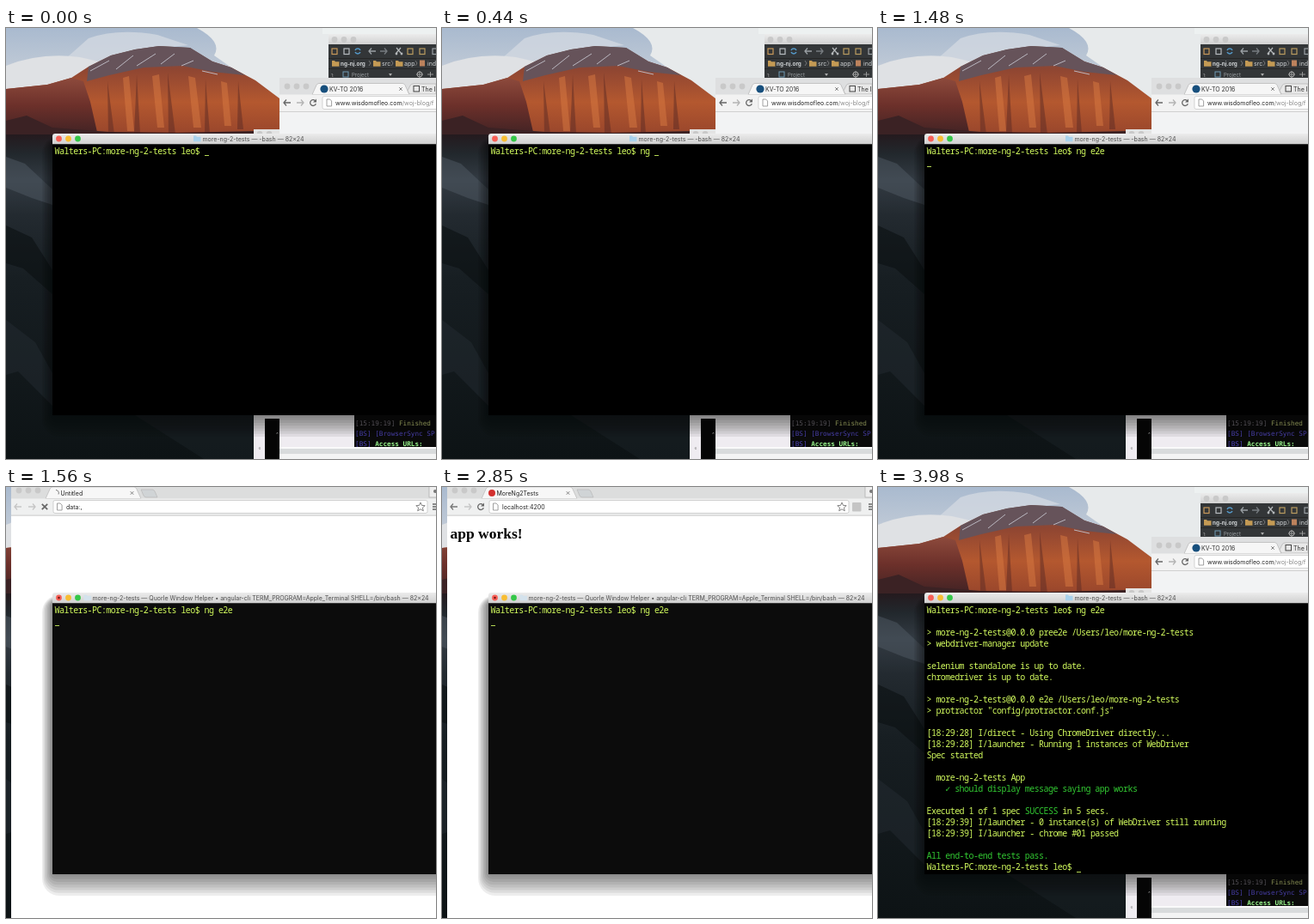
An HTML page for the animation above (8000 ms loop, 500 px wide and 502 px high).

```html
<!DOCTYPE html>
<html lang="en">
<head>
<meta charset="utf-8">
<title>End-to-end test run</title>
<style>
  html, body { margin: 0; width: 100%; height: 100%; overflow: hidden; background: #000; }
  svg { display: block; }
  text { font: 7px Inter, Roboto, sans-serif; white-space: pre; }
  .term text { font: 500 10px "Noto Sans Mono", "DejaVu Sans Mono", monospace; letter-spacing: -.56px; fill: #d2fb5e; }
  .term .ok { fill: #32c832; }
  .log text { font: 7.7px "DejaVu Sans Mono", monospace; }
  .serif { font-family: "Liberation Serif", serif; }
</style>
</head>
<body>
<svg id="stage" width="500" height="502" viewBox="0 0 500 502"></svg>
<script>
const LOOP = 8000, COL = 5.44, ROW = 13.04, LEFT = 56.5, BASE = 146.5;
const HOST = 'Walters-PC:more-ng-2-tests leo$ ';
const stage = document.getElementById('stage');

const rect = (x, y, w, h, fill, more = '') =>
  `<rect x="${x}" y="${y}" width="${w}" height="${h}" fill="${fill}" ${more}/>`;
const path = (d, fill, more = '') => `<path d="${d}" fill="${fill}" ${more}/>`;
const line = (d, color, w = 1) => path(d, 'none', `stroke="${color}" stroke-width="${w}"`);
const dot = (x, y, r, fill, more = '') => `<circle cx="${x}" cy="${y}" r="${r}" fill="${fill}" ${more}/>`;
const text = (x, y, s, fill = '#333', more = '') => `<text x="${x}" y="${y}" fill="${fill}" ${more}>${s}</text>`;
const lights = (x, y, fills) => fills.map((f, i) => dot(x + i * 11, y, 3.4, f)).join('');
const grey = Array(3).fill('#c9c9c9');
const folder = (x, y, fill) => path(`M${x} ${y}h3l1 1.3h4.5v5.5h-8.5z`, fill);
const arrow = (x, y, dir, color) =>
  line(`M${x - 4} ${y}h8M${x + dir} ${y - 3.5}l${dir * 3} 3.5l${-dir * 3} 3.5`, color, 1.3);
const reload = (x, y) =>
  line(`M${x + 2.5} ${y - 2.3}a3.4 3.4 0 1 0 .8 3.5`, '#666', 1.3) + path(`M${x + 4} ${y - 4.5}v4h-4z`, '#666');
const cross = (x, y, r, w, color = '#666') =>
  line(`M${x - r} ${y - r}l${2 * r} ${2 * r}m0 ${-2 * r}l${-2 * r} ${2 * r}`, color, w);
const sheet = (x, y) =>
  path(`M${x} ${y}h3.6l2 2v6h-5.6z`, '#fff', 'stroke="#888" stroke-width=".8"');
const star = x => path(`M${x} 18l1.5 3.4 3.7.3-2.8 2.4.9 3.7-3.3-2-3.3 2 .9-3.7-2.8-2.4 3.7-.3z`,
  'none', 'stroke="#777" stroke-width=".9"');
const gradient = (id, ...stops) => `<linearGradient id="${id}" x2="0" y2="1">${
  stops.map(([at, c]) => `<stop offset="${at}" stop-color="${c}"/>`).join('')}</linearGradient>`;

const defs = `<defs>${
  gradient('sky', [0, '#a9bacf'], [.3, '#bcc7d5'], [.6, '#dcdde2'])}${
  gradient('cliff', [0, '#6f5450'], [.25, '#8f4632'], [.6, '#b4582f'], [.9, '#9c482c'], [1, '#6a3026'])}${
  gradient('slope', [0, '#8d4a3c'], [.45, '#6c302a'], [1, '#3a2023'])}${
  gradient('rock', [0, '#241a1e'], [.06, '#22282d'], [.14, '#333b43'], [.25, '#232a30'], [.45, '#171e22'], [1, '#0d1315'])}${
  gradient('bar', [0, '#ececec'], [1, '#cfcfcf'])}</defs>`;

function photo() {
  return rect(0, 0, 500, 130, 'url(#sky)') +
    path('M96 12Q130 0 176 8L212 20 150 26 100 42 60 44z', '#d3d9e1', 'opacity=".8"') +
    path('M222 0H500V122H318L290 62 262 46 242 32Q252 16 222 0z', '#e7eaeb') +
    path('M0 44Q40 28 86 34L112 40 76 60 48 68 0 72z', '#dfe1e4') +
    path('M0 71L48 66 76 58 96 45 122 32 150 25 178 21 214 23 240 39 262 46 290 61 318 82V130H0z', 'url(#cliff)') +
    path('M0 71L48 66 76 58 90 62 98 86 108 130H0z', 'url(#slope)') +
    path('M96 45L122 32 150 25 178 21 214 23 240 39 262 46 278 55 240 51 205 44 160 46 120 55 94 62z', '#66535a') +
    line('M98 50l22-12m8 10l20-16m4 12l22-14m6 12l16-12m8 14l14-6m10 12l18 4', '#bab7c0') +
    path('M118 62l8 62h-7zM152 55l4 68h-7zM188 52l9 72h-8zM232 60l5 63h-6zM270 62l6 56h-7z', '#5c2a24', 'opacity=".5"') +
    path('M136 58l5 62h8l-6-64zM170 56l6 60h8l-6-62zM212 56l6 60h9l-7-58zM250 62l4 52h8l-5-50z', '#d97a42', 'opacity=".5"') +
    path('M0 108L24 102 54 116 120 121 200 122 290 120 318 122V140H0z', '#3b2224') +
    rect(0, 124, 500, 378, 'url(#rock)') +
    path('M0 150L22 158 54 188V206L30 198 0 186z', '#515b65', 'opacity=".5"') +
    path('M0 230L30 244 54 282V310L20 280 0 274z', '#0a0f11', 'opacity=".6"') +
    path('M0 340L34 366 54 402V440L14 400 0 404z', '#283137', 'opacity=".4"') +
    path('M150 451H287V502H230z', '#1b2327', 'opacity=".5"');
}

function editor() {
  const tools = ['#c9995a', '#b8bcc0', '#5599c8', '#9aa0a4', '#777c80', '#b4b8ba', '#b99c60', '#b99c60', '#9aa0a4'];
  const xs = [382, 396, 409, 426, 439, 457, 470, 484, 499];
  return rect(368, 0, 132, 7, '#edf1f1') +
    rect(375, 7, 125, 13, 'url(#bar)') + lights(382, 13.5, grey) +
    rect(375, 19, 125, 40, '#333638') + rect(375, 35, 125, .8, '#222') + rect(375, 47, 125, .8, '#222') +
    xs.map((x, i) => i === 2 ? line(`M${x - 3} 26a3.3 3.3 0 0 1 6 0m0 2a3.3 3.3 0 0 1-6 0`, tools[i], 1.5)
      : i === 3 || i === 4 ? arrow(x, 27, i === 3 ? -1 : 1, tools[i])
      : i === 5 ? line('M454 23l5 6m0-6l-5 6', tools[i], 1.2) + dot(454, 30, 1.4, tools[i]) + dot(460, 30, 1.4, tools[i])
      : rect(x - 3, 24, 6, 6.5, 'none', `stroke="${tools[i]}" stroke-width="1.2"`)).join('') +
    [[379, 'ng-nj.org'], [427, 'src'], [453, 'app']].map(([x, s], i) =>
      folder(x, 38, '#c49a54') + text(x + 10, 44, s, '#d0d3d5', i ? '' : 'style="font-size:6.3px;font-weight:700"')).join('') +
    line('M422 38l2 3-2 3M448 38l2 3-2 3M476 38l2 3-2 3', '#888', .8) +
    rect(481, 37.5, 6, 7, '#bd825c') + text(490, 44, 'ind', '#d0d3d5') +
    text(378, 57, '1:', '#aaa', 'style="font-size:5px"') + rect(392, 51, 6, 6, 'none', 'stroke="#719ab3"') +
    text(402, 56.5, 'Project', '#9ba0a3', 'style="font-size:6px"') + path('M445 53h4l-2 3z', '#aaa') +
    dot(481, 54, 3, 'none', 'stroke="#aaa"') + line('M481 50v8m-4-4h8M490 54h7m-3.5-3v6', '#aaa', .8);
}

function backBrowser() {
  return rect(288, 118, 33, 10, '#e4e4e4') + lights(295, 123.5, grey.slice(1)) +
    rect(318, 58, 182, 66, '#f2f3f4') + rect(318, 58, 182, 20, '#dedfe0') + lights(327, 68, grey) +
    path('M356 77.5l5-11q1-2 3-2h97q2 0 3 2l5 11z', '#f6f6f6', 'stroke="#b4b4b4" stroke-width=".7"') +
    path('M467 73l3-6q1-2 3-2h27v12h-31z', '#e8e8e8', 'stroke="#b4b4b4" stroke-width=".7"') +
    dot(370, 71, 4.6, '#174f7d') + text(376, 73.5, 'KV-TO 2016') + cross(459, 71, 1.8, .8) +
    rect(474, 67.5, 6.5, 6.5, 'none', 'stroke="#444"') + text(483, 73.5, 'The In') +
    rect(318, 77.5, 182, 19.5, '#f2f2f2') + rect(318, 97, 182, .7, '#c2c2c2') +
    arrow(327, 87, -1, '#666') + arrow(342, 87, 1, '#b4b4b4') + reload(357, 87) +
    rect(368, 79.5, 140, 15, '#fff', 'rx="2" stroke="#c4c4c4" stroke-width=".7"') + sheet(373, 83) +
    text(383, 89.5, 'www.wisdomofleo.com<tspan fill="#888">/woj-blog/f</tspan>', '#222');
}

function lowerWindows() {
  return rect(288, 445, 212, 57, '#efecf1') + rect(301, 455, 17, 47, '#050505') +
    rect(318, 488, 182, 2, '#fafafa') + rect(318, 490, 182, 6, '#d8dbdc') + rect(318, 496, 182, 6, '#f3f4f4') +
    text(293.5, 491, 'e', '#888', 'style="font-size:5px"') + text(314, 475, '^', '#aaa', 'style="font-size:6px"') +
    rect(405, 445, 95, 43, '#0a0a0a') +
    `<g class="log">${
      text(406, 463, '[15:19:19] <tspan fill="#c3cd78">Finished</tspan>', '#77737b')}${
      text(406, 475, '[BS] [BrowserSync SP', '#4d43b5')}${
      text(406, 487, '[BS] <tspan fill="#98f58c" font-weight="700">Access URLs:</tspan>', '#4d43b5')}</g>`;
}

function shadow() {
  let s = '';
  for (let i = 0; i < 8; i++)
    s += rect(42 + i * 1.5, 126 + i, 480, 350 - i * 4.2, '#000', `rx="${20 - i * 2}" opacity=".07"`);
  return s;
}

function browser({ tab, url, busy, app, body }) {
  const icon = app ? dot(58, 7, 4, '#d3302f')
    : busy ? line('M58 3.5a3.5 3.5 0 0 1 3 5', '#777', 1) : sheet(55, 3);
  return rect(6, 0, 494, 502, '#fff') + rect(6, 0, 494, 14, '#dcdddd') + lights(15, 4, grey) +
    path('M46 13.5l5-11q1-2.5 3-2.5h95q2 0 3 2.5l5 11z', '#f7f7f7', 'stroke="#b8b8b8" stroke-width=".7"') +
    path('M157 3h13q2 0 3 2l3 7h-13q-2 0-3-2z', '#d0d4d6', 'stroke="#b8b8b8" stroke-width=".7"') +
    icon + text(63.5, 9.5, tab, '#222') + cross(146.5, 7, 1.8, .8) +
    rect(492, -1, 12, 13, '#eee', 'stroke="#aaa" stroke-width=".7"') + dot(499, 5, 2, '#777') +
    rect(6, 13.5, 494, 19.5, '#eff0f0') + rect(6, 32.7, 494, .8, '#bcbcbc') +
    arrow(14, 23, -1, app ? '#777' : '#c6c6c6') + arrow(30, 23, 1, '#c6c6c6') +
    (busy ? cross(45, 23, 3.2, 1.7) : reload(45, 23)) +
    rect(55, 15.5, url === 'data:,' ? 435 : 418, 15, '#fff', 'rx="2" stroke="#bfbfbf" stroke-width=".7"') +
    sheet(59.5, 19) + text(70, 25.7, url, '#222') +
    (url === 'data:,' ? star(482) : star(465) + rect(477, 18, 10.5, 10.5, '#c5c5c5', 'rx="1"')) +
    line('M496 20h6m-6 3h6m-6 3h6', '#666', 1.3) + body;
}

const term = (row, s, cls = '') => text(LEFT, BASE + row * ROW, s, '', `class="${cls}"`);
const output = [
  [2, '&gt; more-ng-2-tests@0.0.0 pree2e /Users/leo/more-ng-2-tests'],
  [3, '&gt; webdriver-manager update'],
  [5, 'selenium standalone is up to date.'],
  [6, 'chromedriver is up to date.'],
  [8, '&gt; more-ng-2-tests@0.0.0 e2e /Users/leo/more-ng-2-tests'],
  [9, '&gt; protractor "config/protractor.conf.js"'],
  [11, '[18:29:28] I/direct - Using ChromeDriver directly...'],
  [12, '[18:29:28] I/launcher - Running 1 instances of WebDriver'],
  [13, 'Spec started'],
  [15, '  more-ng-2-tests App'],
  [16, '    ✓ should display message saying app works', 'ok'],
  [18, 'Executed 1 of 1 spec <tspan class="ok">SUCCESS</tspan> in 5 secs.'],
  [19, '[18:29:39] I/launcher - 0 instance(s) of WebDriver still running'],
  [20, '[18:29:39] I/launcher - chrome #01 passed'],
  [22, 'All end-to-end tests pass.', 'ok'],
  [23, HOST]
].map(args => term(...args)).join('');

function terminal({ typed, running, page, done }) {
  const entered = typed.endsWith('\n');
  const [row, col] = done ? [23, HOST.length] : entered ? [1, 0] : [0, HOST.length + typed.length];
  const title = 'more-ng-2-tests — ' + (running
    ? 'Quorle Window Helper • angular-cli TERM_PROGRAM=Apple_Terminal SHELL=/bin/bash' : '-bash') + ' — 82×24';
  return rect(54, 135, 446, 316, page ? '#0c0c0c' : '#000') +
    path('M54 135.3v-9q0-3.3 3.3-3.3H500v12.3z', 'url(#bar)') +
    lights(61.5, 129, ['#f75f56', '#f8bd32', '#34c748']) + (running ? dot(61.5, 129, 1.2, '#6b100d') : '') +
    folder(running ? 90.5 : 218, 125.5, running ? '#d4e2ec' : '#a9d2ec') +
    text(running ? 296 : 287.5, 131.5, title, '#505050', 'text-anchor="middle"') +
    `<g class="term">${term(0, HOST + typed.trimEnd())}${done ? output : ''}</g>` +
    rect(Math.round(LEFT + col * COL), Math.round(148 + row * ROW), 5, 1, '#b4d654');
}

const steps = [
  [0, { typed: '' }],
  [90, { typed: 'ng' }],
  [440, { typed: 'ng ' }],
  [890, { typed: 'ng e' }],
  [980, { typed: 'ng e2' }],
  [1060, { typed: 'ng e2e' }],
  [1150, { typed: 'ng e2e\n' }],
  [1560, { running: true, page: { tab: 'Untitled', url: 'data:,', busy: true, body: '' } }],
  [1650, { page: { tab: 'data:,', url: 'data:,', body: '' } }],
  [2010, { page: { tab: 'localhost:4200', url: 'localhost:4200', busy: true, body: '' } }],
  [2100, { page: { tab: 'MoreNg2Tests', url: 'localhost:4200', app: true,
    body: text(10, 46, 'Loading...', '#000', 'class="serif" style="font-size:8.8px"') } }],
  [2850, { page: { tab: 'MoreNg2Tests', url: 'localhost:4200', app: true,
    body: text(9.5, 60, 'app works!', '#000', 'class="serif" style="font-size:17.5px;font-weight:700"') } }],
  [3920, { page: null }],
  [3980, { running: false, done: true }]
];

stage.innerHTML = defs + photo() + editor() + backBrowser() + lowerWindows() +
  '<g id="page"></g>' + shadow() + '<g id="terminal"></g>';
const pageLayer = document.getElementById('page');
const terminalLayer = document.getElementById('terminal');
const start = performance.now();
let shown = 0;

function draw() {
  const t = (performance.now() - start) % LOOP;
  const count = steps.filter(([at]) => at <= t).length;
  if (count !== shown) {
    shown = count;
    const state = Object.assign({}, ...steps.slice(0, count).map(([, change]) => change));
    pageLayer.innerHTML = state.page ? browser(state.page) : '';
    terminalLayer.innerHTML = terminal(state);
  }
  requestAnimationFrame(draw);
}
draw();
</script>
</body>
</html>
```
